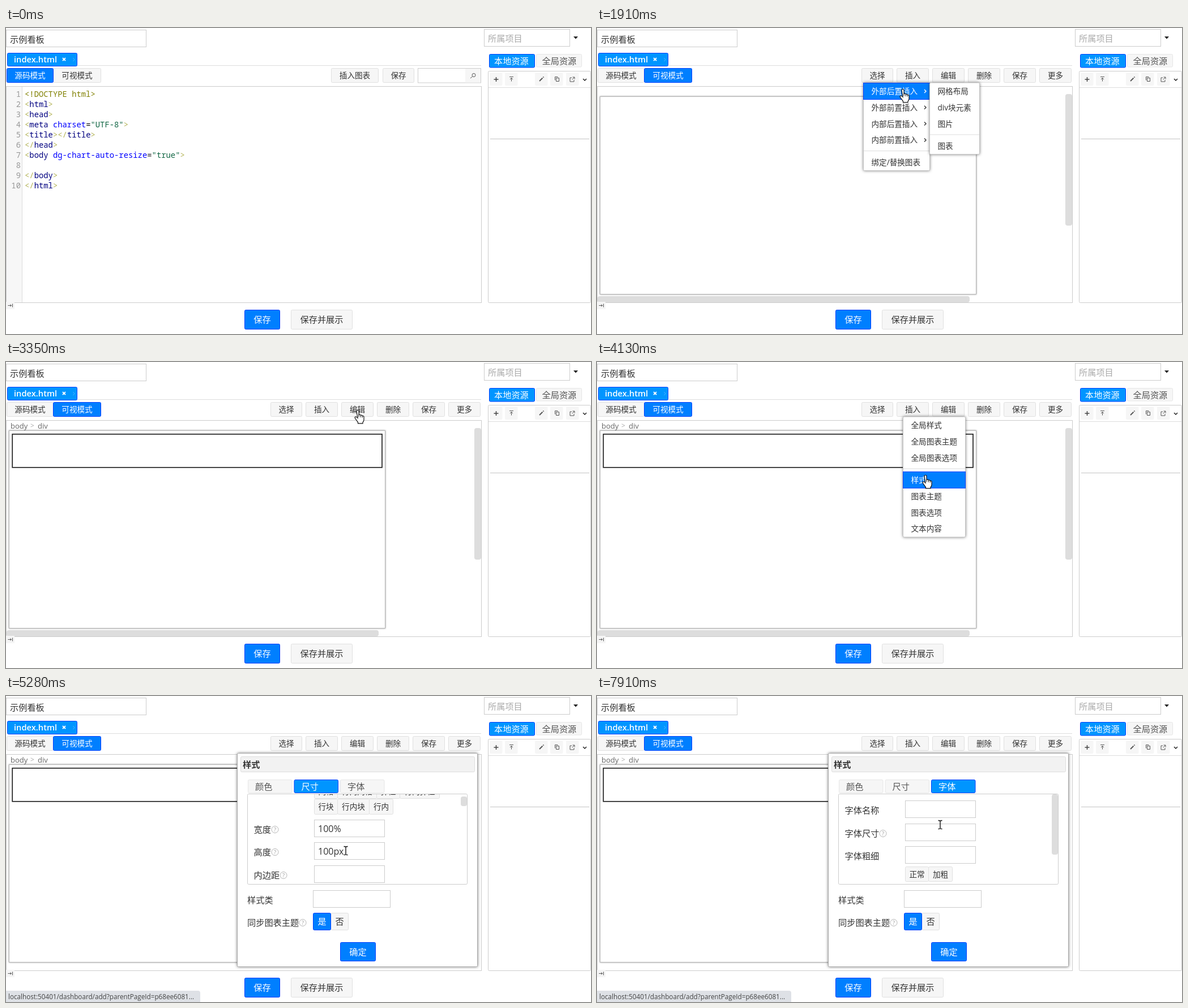
An HTML page that plays this animation: 1033x542 px, repeating every 8000 ms.

```html
<!DOCTYPE html>
<html lang="zh-CN">
<head>
<meta charset="UTF-8">
<title>看板编辑器</title>
<style>
html, body { margin: 0; width: 100%; height: 100%; overflow: hidden; background: #fff; }
svg { display: block; width: 1033px; height: 542px; }
text { font-family: "Open Sans", "Noto Sans CJK SC", "Noto Sans CJK", sans-serif; white-space: pre; }
.mono { font-family: "Noto Sans Mono", "DejaVu Sans Mono", monospace; }
.shadow { filter: drop-shadow(0 0 2.5px rgba(0, 0, 0, .5)); }
.line { fill: none; stroke: #555; stroke-width: 1; }
</style>
</head>
<body>
<svg id="stage" viewBox="0 0 1033 542"></svg>
<script>
const LOOP = 8000;
const BLUE = '#007fff', TAB = '#0095ff', ACTIVE_EDGE = '#003eff', PALE = '#f6f6f6', EDGE = '#ddd', INK = '#333';
const BIG = 15.2, SMALL = 13.6;

const esc = s => s.replace(/&/g, '&amp;').replace(/</g, '&lt;');
const box = (x1, y1, x2, y2, fill, stroke = 'none', extra = '') =>
  `<rect x="${x1}" y="${y1}" width="${x2 - x1}" height="${y2 - y1}" fill="${fill}" stroke="${stroke}" ${extra}/>`;
const text = (x, cy, s, size = BIG, fill = INK, extra = '') =>
  `<text x="${x}" y="${(cy + size * .37).toFixed(2)}" font-size="${size}" fill="${fill}" ${extra}>${esc(s)}</text>`;
const centered = (x, cy, s, size, fill) => text(x, cy, s, size, fill, 'text-anchor="middle"');
const path = (d, extra = 'class="line"') => `<path d="${d}" ${extra}/>`;
const rule = (x1, x2, y, color = EDGE) => path(`M${x1} ${y}H${x2}`, `stroke="${color}"`);
const input = (x1, y1, x2, y2) => box(x1, y1, x2, y2, '#fff', '#ccc');

// Visible during each [from, to) span
const during = (spans, content, extra = '') =>
  `<g data-spans='${JSON.stringify(spans)}' ${extra}>${content}</g>`;

function button(x1, y1, x2, y2, label, active = false, size = SMALL) {
  return box(x1 + .5, y1 + .5, x2 - .5, y2 - .5, active ? BLUE : PALE, active ? ACTIVE_EDGE : '#e0e0e0', 'rx="2"')
    + centered((x1 + x2) / 2, (y1 + y2) / 2 + .3, label, size, active ? '#fff' : INK);
}
function tab(x1, y1, x2, y2, textX, label, active) {
  return box(x1 + .5, y1 + .5, x2 - .5, y2, active ? TAB : PALE, active ? ACTIVE_EDGE : '#e6e6e6', 'rx="2"')
    + text(textX, (y1 + y2) / 2 + .5, label, BIG, active ? '#fff' : '#555');
}
const help = (x, y) => `<circle cx="${x}" cy="${y}" r="6" fill="none" stroke="#b5b5b5"/>`
  + centered(x, y, '?', 9.5, '#999');
function field(cy, label, value = '', helpX = 0) {
  return text(437.5, cy, label) + (helpX ? help(helpX, cy + .5) : '')
    + input(544.5, cy - 16.5, 668.5, cy + 13.5) + text(551, cy - 1, value, 16);
}

function codeView() {
  const lines = ['<!DOCTYPE html>', '<html>', '<head>', '<meta charset="UTF-8">', '<title></title>', '</head>',
    '<body dg-chart-auto-resize="true">', '', '</body>', '</html>'];
  const colors = ['#808000', '#b3b355', '#116644', '#00f', '#000080', '#000'];
  const token = /(<!.+>)|(<\/?|>)|("[^"]+")|([\w-]+)(?==)|(\w+)|(.)/g;
  const paint = s => s.replace(token, (m, ...g) => `<tspan fill="${colors[g.findIndex(v => v)]}">${esc(m)}</tspan>`);
  return box(1, 104, 29, 486, '#f7f7f7') + path('M28.5 104V486', `stroke="${EDGE}"`)
    + lines.map((s, i) => {
      const y = 122.3 + i * 18;
      return `<text class="mono" font-size="13.87" x="26" y="${y}" text-anchor="end" fill="#999">${i + 1}</text>`
        + `<text class="mono" font-size="13.87" x="33" y="${y}">${paint(s)}</text>`;
    }).join('');
}

function frameView() {
  return input(.5, 3.5, 247.5, 33.5) + text(7, 20, '示例看板')
    + input(844.5, 2.5, 995.5, 32.5) + text(851, 18, '所属项目', BIG, '#aaa')
    + path('M1002 15h8l-4 4.5z', 'fill="#222"')
    + rule(126, 839, 66.5)
    + box(2.5, 44.5, 125.5, 67.5, TAB, ACTIVE_EDGE, 'rx="2"')
    + text(14, 56, 'index.html', 14.7, '#fff', 'font-weight="600"')
    + path('M100 53l5 5m0-5l-5 5', 'stroke="#fff" stroke-width="1.8"')
    + path('M118.5 53l2.5 3l-2.5 3', 'fill="none" stroke="#4db5ff"')
    + tab(853, 46, 934, 70, 862, '本地资源', true) + tab(936, 46, 1017, 69, 946.5, '全局资源', false)
    + box(851.5, 76.5, 1032.5, 486.5, '#fff', '#ccc', 'rx="2"') + rule(852, 1032, 105.5)
    + [865, 892, 945, 972, 1000].map(x => box(x - 11, 79, x + 11.5, 102, PALE, 'none', 'rx="2"')).join('')
    + path('M861.5 91h8m-4-4v8', 'stroke="#444" stroke-width="1.5"')
    + path('M889 86.5h7m-3.5 8v-6m-2.5 2.5l2.5-2.5l2.5 2.5')
    + path('M942 94l5.5-5.5m1-1l1-1', 'stroke="#555" stroke-width="1.8"')
    + path('M971.5 88.5h5v6h-5zm-2 4v-6h5')
    + path('M999 88h-3v7h7v-3m-3.5-.5l4-4m-3-.5h3.5v3.5')
    + path('M1019 90l3 3l3-3', 'fill="none" stroke="#222" stroke-width="1.5"')
    + rule(855, 1030, 196.5, '#c4c4c4')
    + box(.5, 103.5, 839.5, 486.5, '#fff', '#ccc');
}
function footerView() {
  return box(0, 485, 15, 498, '#f5f5f5') + path('M3.5 491.5h6m-2-2l2 2l-2 2m4-5v6')
    + button(421, 499, 484, 534, '保存', true, BIG) + button(503, 499, 612, 534, '保存并展示', false, BIG);
}
const modes = visual => button(1, 71, 84, 97, '源码模式', !visual) + button(83, 71, 168, 97, '可视模式', visual);

function sourceView() {
  return button(83, 71, 168, 97, '可视模式') + button(1, 71, 84, 97, '源码模式', true)
    + button(574, 71, 658, 97, '插入图表') + button(665, 71, 721, 97, '保存')
    + input(727.5, 71.5, 838.5, 97) + box(811, 72, 838, 96.5, PALE)
    + '<circle cx="826" cy="83.5" r="3" class="line"/>' + path('M823.5 86l-3.5 3')
    + codeView();
}
function visualView() {
  return modes(true)
    + ['选择', '插入', '编辑', '删除', '保存', '更多'].map((s, i) =>
      button(Math.round(466.5 + i * 62.9), 71, Math.round(523 + i * 62.9), 97, s)).join('')
    + box(5.5, 121.5, 669.5, 471.5, '#fff', '#b5b5b5', 'style="filter:drop-shadow(0 0 1.5px #999)"');
}
const bar = (x1, y1, x2, y2) => box(x1, y1, x2, y2, '#ddd', 'none', 'rx="4"');

function insertedBlock() {
  return text(8, 113, 'body', 13, '#666') + text(43, 113, '>', 12, '#aaa') + text(56, 113, 'div', 13, '#666')
    + box(11.2, 127.8, 664, 186.8, '#fff', '#222', 'stroke-width="1.7"');
}

// items: null stands for a separator
function menu(x1, x2, items, active = -1, arrows = 0) {
  let cy = 112, body = '';
  items.forEach((s, i) => {
    if (!s) { body += rule(x1 + 1, x2 - 1, cy - 9.5); cy += 10.5; return; }
    const on = i === active, color = on ? '#fff' : INK;
    if (on) body += box(x1 + .5, cy - 14.5, x2 - .5, cy + 14.5, BLUE, ACTIVE_EDGE);
    body += text(x1 + 14.5, cy, s, SMALL, color);
    if (i < arrows) body += path(`M${x2 - 10} ${cy - 3}l3 3l-3 3`, `fill="none" stroke="${color}" stroke-width="1.4"`);
    cy += 28.8;
  });
  return box(x1 + .5, 97, x2 - .5, cy - 14, '#fff', '#c5c5c5', 'rx="2" class="shadow"') + body;
}
const insertMenu = active => menu(470, 588, ['外部后置插入', '外部前置插入', '内部后置插入', '内部前置插入', null, '绑定/替换图表'], active, 4);
const elementMenu = active => menu(587, 676, ['网格布局', 'div块元素', '图片', null, '图表'], active);
const editMenu = active => menu(540, 651,
  ['全局样式', '全局图表主题', '全局图表选项', null, '样式', '图表主题', '图表选项', '文本内容'], active);

function dialog() {
  return box(408.5, 101.5, 832.5, 479.5, '#fff', '#aaa', 'rx="2" class="shadow"')
    + box(414.5, 107.5, 827.5, 134.5, '#f2f2f2', EDGE, 'rx="2"')
    + text(418, 121.5, '样式', BIG, INK, 'font-weight="bold"')
    + box(426.5, 173.5, 814.5, 333.5, '#fff', '#ccc', 'rx="2"')
    + text(426, 361, '样式类') + input(542.5, 344.5, 678.5, 374.5)
    + text(426, 401, '同步图表主题') + help(524, 401.5)
    + button(573, 384, 605, 415, '否', false, BIG) + button(542, 384, 574, 415, '是', true, BIG)
    + button(590, 436, 653, 470, '确定', true, BIG);
}
const tabs = active => ['颜色', '尺寸', '字体'].map((s, i) =>
  tab(427 + i * 81.5, 148, 505.5 + i * 81.5, 171.5, 440 + i * 81.5, s, i === active)).join('');
const clipped = s => `<g clip-path="url(#panel)">${s}</g>`;

function colorTab() {
  return tabs(0) + clipped(field(202, '前景色') + field(243, '背景色') + field(283, '边框颜色') + field(324, '边框宽度'));
}
function sizeTab(scrolled) {
  const rows = field(134, '显示')
    + button(544, 155, 586, 182, '网格') + button(585, 155, 655, 182, '行内网格')
    + button(654, 155, 696, 182, '弹性') + button(695, 155, 766, 182, '行内弹性')
    + button(544, 182, 586, 210, '行块') + button(585, 182, 642, 210, '行内块') + button(641, 182, 684, 210, '行内')
    + field(236, '宽度', '100%', 475) + field(276, '高度', '', 475) + field(317, '内边距', '', 490)
    + (scrolled ? '' : text(551, 275, '100px', 16));
  return clipped(`<g transform="translate(0 ${scrolled ? 0 : 68})">${rows}</g>`)
    + (scrolled ? bar(803, 178, 814, 195) : bar(803, 174, 814, 191));
}
function fontTab() {
  return tabs(2) + clipped(field(202, '字体名称') + field(243, '字体尺寸', '', 505) + field(283, '字体粗细')
    + button(544, 302, 586, 329, '正常') + button(585, 302, 628, 329, '加粗')) + bar(803, 174, 814, 281);
}

const typed = (s, caretX) => text(551, 275, s, 16) + path(`M${caretX} 265.5v18`, 'stroke="#222"');
function inputMethod() {
  let s = box(544, 291, 726, 347, '#fff') + path('M544.5 293V347', 'stroke="#e4e4e4"') + path('M725.5 333V347', `stroke="${EDGE}"`)
    + `<g clip-path="url(#list)">${text(553, 318, '3', 14)}${text(554, 349, '3', 14)}</g>`
    + box(557.5, 288.5, 997.5, 329.5, '#fff', '#0078d7') + box(557, 288, 615, 330, '#0078d7');
  [...'人让如日若任热'].forEach((c, i) => {
    const x = 573 + i * 56.8;
    s += text(x, 311.5, String(i + 1), 12, i ? '#777' : '#fff') + text(x + 9, 310, c, 17.5, i ? '#111' : '#fff');
  });
  return s + path('M955.5 289V329', 'stroke="#0078d7"')
    + '<circle cx="977" cy="309" r="7.5" fill="none" stroke="#222" stroke-width="1.3"/>'
    + path('M973 311q4 5 8 0', 'fill="none" stroke="#222" stroke-width="1.2"')
    + '<circle cx="974.5" cy="307" r="1.1"/><circle cx="979.5" cy="307" r="1.1"/>';
}
function statusBar() {
  return path('M0 522H339q4 0 4 4V542H0z', 'fill="#dee1e6"')
    + text(4, 533, 'localhost:50401/dashboard/add?parentPageId=p68ee6081...', 11.7, '#444');
}

const pointers = {
  hand: path('M-2 1.5q0-2 2-2t2 2v6q2.5-1 3.3 .8q2.2-.8 3 1q2.7-.3 2.7 2v5q0 2.5-2 4.5v2h-8.5v-2l-5-7q-1-2 .5-2.7q1.5-.6 4 2z',
    'fill="#fff" stroke="#111" stroke-width="1.2"') + path('M2 7.5v4m3.3-3v3.5m3-2.5v3', 'stroke="#111" fill="none"'),
  arrow: path('M0 0V16l4-3.5l2.5 6l2.5-1l-2.5-6h5z', 'fill="#fff" stroke="#111"'),
  beam: path('M-3.5-7.5q3 0 3.5 1q.5-1 3.5-1M0-6.5v13M-3.5 7.5q3 0 3.5-1q.5 1 3.5 1', 'fill="none" stroke="#111" stroke-width="1.4"')
};
// [time, pointer, x, y]
const moves = [
  [230, 'beam', 190, 140], [460, 'hand', 134, 90], [1180, 'arrow', 352, 92], [1420, 'hand', 556, 86],
  [1660, 'hand', 540, 109], [2140, 'hand', 608, 109], [2380, 'hand', 630, 108],
  [2870, 'arrow', 630, 110], [3110, 'arrow', 626, 100], [3340, 'hand', 621, 86],
  [3840, 'hand', 592, 109], [4130, 'hand', 580, 201], [4560, 'arrow', 556, 182], [4800, 'hand', 545, 156],
  [5040, 'beam', 600, 235], [5280, 'beam', 600, 274], [7200, 'hand', 622, 156], [7670, 'beam', 610, 200], [7910, 'beam', 606, 228]
];

const stage = document.getElementById('stage');
stage.innerHTML = `<defs><clipPath id="panel">${box(427, 174, 814, 333, '#000')}</clipPath>
  <clipPath id="list">${box(545, 292, 725, 347, '#000')}</clipPath></defs>`
  + frameView()
  + during([[0, 700]], sourceView())
  + during([[700, LOOP]], visualView())
  + during([[700, 4320]], bar(827, 117, 839, 350) + bar(1, 475, 658, 486))
  + during([[460, 700]], button(83, 71, 168, 97, '可视模式'), 'class="shadow"')
  + during([[700, 1180]], button(83, 71, 168, 97, '可视模式', true), 'class="shadow"')
  + footerView()
  + during([[2870, LOOP]], insertedBlock())
  + during([[1420, 1660]], insertMenu(-1))
  + during([[1660, 2870]], insertMenu(0))
  + during([[1660, 2140]], elementMenu(-1))
  + during([[2140, 2870]], elementMenu(0))
  + during([[3580, 3840]], editMenu(-1))
  + during([[3840, 4130]], editMenu(0))
  + during([[4130, 4320]], editMenu(4))
  + during([[4320, LOOP]], dialog())
  + during([[4320, 4800]], colorTab())
  + during([[4800, 7200]], tabs(1))
  + during([[4800, 5280]], sizeTab(false))
  + during([[5280, 7200]], sizeTab(true))
  + during([[5520, 7200]], box(544.5, 259.5, 668.5, 289.5, '#fff', '#ccc', 'style="filter:drop-shadow(0 0 1.5px #999)"'))
  + during([[5520, 5750]], box(551, 265, 597, 286, '#0078d7'))
  + during([[5280, 5520]], text(551, 275, '100px', 16))
  + during([[5520, 5750]], text(551, 275, '100px', 16, '#fff'))
  + during([[5750, 6240]], typed('', 551.5))
  + during([[6240, 6480]], typed('3', 560.5))
  + during([[6480, 6710]], typed('3r', 566.5) + rule(560, 566, 283.5, INK) + inputMethod())
  + during([[6710, 7200]], typed('3rem', 591.5))
  + during([[7200, LOOP]], fontTab())
  + during([[4800, 5520], [7200, LOOP]], statusBar())
  + Object.entries(pointers).map(([name, s]) => `<g id="${name}">${s}</g>`).join('');

const layers = [...stage.querySelectorAll('[data-spans]')].map(el => ({ el, spans: JSON.parse(el.dataset.spans) }));
const show = (el, on) => { el.style.display = on ? '' : 'none'; };
const start = performance.now();

function render() {
  const t = (performance.now() - start) % LOOP;
  for (const { el, spans } of layers) show(el, spans.some(([from, to]) => t >= from && t < to));
  const move = moves.filter(m => m[0] <= t).pop();
  for (const name in pointers) {
    const el = document.getElementById(name), on = !!move && move[1] === name;
    show(el, on);
    if (on) el.setAttribute('transform', `translate(${move[2]} ${move[3]})`);
  }
  requestAnimationFrame(render);
}
render();
</script>
</body>
</html>
```
